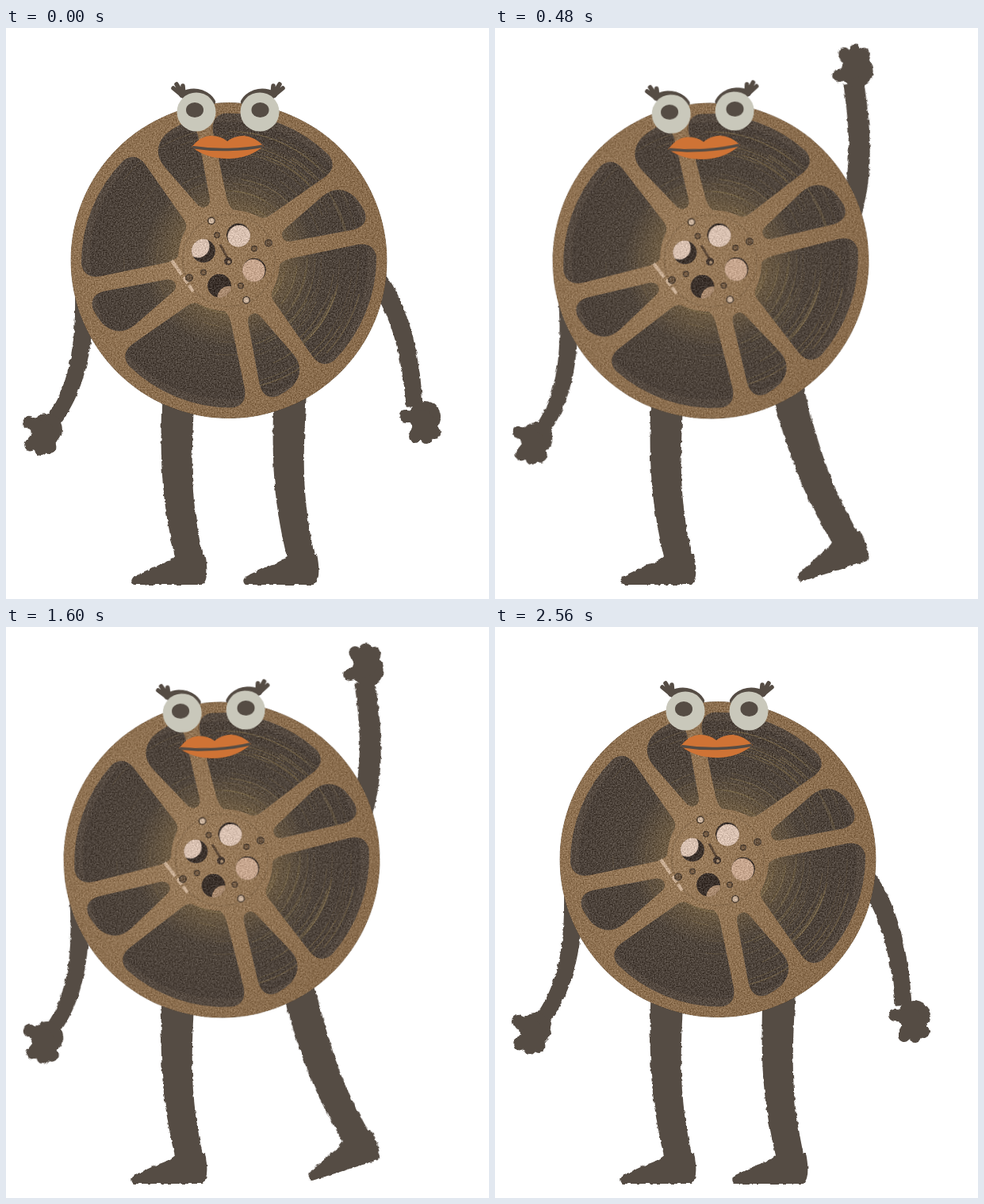
Recreate the animation shown at these times as an HTML page. Size 609 px wide and 721 px high, loop 2.72 s.

```html
<!DOCTYPE html>
<html lang="en">
<head>
<meta charset="utf-8">
<title>Waving film reel</title>
<style>
  html, body { margin: 0; width: 100%; height: 100%; overflow: hidden; background: #fff; }
  svg { display: block; width: 100%; height: 100%; }
</style>
</head>
<body>
<svg viewBox="0 0 609 721">
  <defs>
    <filter id="rough" filterUnits="userSpaceOnUse" x="0" y="0" width="609" height="721" color-interpolation-filters="sRGB">
      <feTurbulence id="boil" type="fractalNoise" baseFrequency=".16" numOctaves="2" seed="1"/>
      <feDisplacementMap in="SourceGraphic" scale="4" xChannelSelector="R" yChannelSelector="G"/>
    </filter>
    <filter id="grain" filterUnits="userSpaceOnUse" x="-210" y="-210" width="420" height="420" color-interpolation-filters="sRGB">
      <feTurbulence type="fractalNoise" baseFrequency=".6" numOctaves="2" seed="4"/>
      <feColorMatrix values="1 0 0 0 0  1 0 0 0 0  1 0 0 0 0  0 0 0 0 1" result="noise"/>
      <feComposite in="SourceGraphic" in2="noise" operator="arithmetic" k2="1" k3=".4" k4="-.2"/>
      <feComposite in2="SourceGraphic" operator="in"/>
    </filter>
    <radialGradient id="metal" gradientUnits="userSpaceOnUse" cx="-40" cy="-10" r="240">
      <stop offset="0" stop-color="#9a7c5b"/><stop offset="1" stop-color="#886b4c"/>
    </radialGradient>
    <radialGradient id="wound" gradientUnits="userSpaceOnUse" r="200" cx="0" cy="0">
      <stop offset=".35" stop-color="#6b5a43"/><stop offset=".55" stop-color="#4f453c"/><stop offset="1" stop-color="#4a4039"/>
    </radialGradient>
    <clipPath id="slots"></clipPath>
    <clipPath id="disc"><circle r="15"/></clipPath>
    <g id="lid" fill="none" stroke="#554c44" stroke-linecap="round">
      <path stroke-width="8" d="M222 84Q235 78 246 82Q256 86 260 93"/>
      <path stroke-width="5.500" d="M223 86L211 76M223 84L215 71M224 83L223 73"/>
    </g>
    <g id="hand" stroke="#554c44" stroke-width="16" stroke-linecap="round">
      <circle r="20" stroke="none"/>
      <path d="M0 0L-24 -1M-4 4L-12 25M0 4L2 26M4 4L12 20"/>
    </g>
    <g id="leg">
      <path id="shin"/>
      <path d="M215 664Q212 672 190 679L162 692Q155 698 161 703L248 703Q257 695 251 664Z"/>
    </g>
  </defs>

  <g fill="#554c44" filter="url(#rough)">
    <use href="#leg"/>
    <use id="legR" href="#leg"/>
    <g id="armL"><path id="sleeveL"/><use href="#hand" transform="translate(51 507) rotate(20)"/></g>
    <g id="armDown"><path id="sleeveDown"/><use href="#hand" transform="translate(528 491)"/></g>
    <g id="armUp"><path id="sleeveUp"/><use href="#hand" transform="translate(496 64) scale(1 -1)"/></g>
  </g>

  <g id="body">
    <g transform="translate(281 293.5)" filter="url(#grain)">
      <circle r="199.500" fill="url(#metal)"/>
      <g clip-path="url(#slots)">
        <circle r="200" fill="url(#wound)"/>
        <circle r="181" fill="none" stroke="#5a4f45" stroke-width="12" opacity=".6"/>
        <g id="film" fill="none" stroke="#947f55"></g>
      </g>
      <circle r="58" fill="none" stroke="#7b6246" stroke-width="2" opacity=".4"/>
      <path d="M-72 0L-45 39" stroke="#cbb096" stroke-width="4" stroke-dasharray="22 4 9 3"/>
      <g id="hub"></g>
      <path d="M-11 -20L1 2" stroke="#5a4635" stroke-width="3"/>
      <circle cx="-1" cy="1" r="5" fill="#453830"/><circle cy="2" r="2" fill="#a98d6f"/>
    </g>
    <use href="#lid"/>
    <use href="#lid" transform="matrix(-1 0 0 1 560 0)"/>
    <g fill="#c9c8bb"><circle cx="240" cy="106" r="24.500"/><circle cx="320" cy="106" r="24.500"/></g>
    <g fill="#554c44"><ellipse cx="238" cy="103.500" rx="11" ry="9.500"/><ellipse cx="320.500" cy="103.500" rx="11" ry="9.500"/></g>
    <path fill="#cf7335" d="M234 150Q246 136 258 136Q271 136 279 143Q288 136 300 136Q313 137 325 149Q306 165 280 165Q252 165 234 150Z"/>
    <path fill="none" stroke="#554c44" stroke-width="3.500" d="M235 150.500Q257 154 280 153.500Q305 153 324 149"/>
  </g>
</svg>

<script>
const $ = id => document.getElementById(id);
const add = (parent, tag, attrs) => {
  const el = parent.appendChild(document.createElementNS('http://www.w3.org/2000/svg', tag));
  for (const k in attrs) el.setAttribute(k, attrs[k]);
  return el;
};
const turn = (id, value) => $(id).setAttribute('transform', value);

// Tapered tube around a cubic curve, from width w0 to w1
function tube(id, [a, b, c, d], w0, w1) {
  const left = [], right = [];
  for (let t = 0; t <= 1; t += 1 / 32) {
    const s = 1 - t;
    const [x, y] = [0, 1].map(k => s ** 3 * a[k] + 3 * s * s * t * b[k] + 3 * s * t * t * c[k] + t ** 3 * d[k]);
    const [u, v] = [0, 1].map(k => s * s * (b[k] - a[k]) + 2 * s * t * (c[k] - b[k]) + t * t * (d[k] - c[k]));
    const r = (w0 + (w1 - w0) * t) / 2 / Math.hypot(u, v);
    left.push([x - v * r, y + u * r]);
    right.unshift([x + v * r, y - u * r]);
  }
  $(id).setAttribute('d', `M${left.concat(right).join('L')}Z`);
}
tube('shin', [[218, 440], [214, 540], [211, 590], [235, 685]], 42, 34);
tube('sleeveL', [[99, 335], [99, 390], [94, 455], [54, 502]], 24, 19);
tube('sleeveDown', [[464, 312], [494, 350], [510, 405], [515, 478]], 25, 21);
tube('sleeveUp', [[450, 250], [478, 200], [487, 145], [489, 78]], 28, 26);

// One wide and one slim opening, a plate screw and a hub hole per quarter turn
const wide = 'M64 5Q70 -1 80 -3L162 -20Q183 -23 186 -4A186 186 0 0 1 133 126Q118 137 106 122L57 52Q51 44 56 36Q63 22 64 5Z';
const slim = 'M67 -31Q66 -36 72 -41L118 -81Q139 -98 159 -80Q166 -72 171 -62Q177 -45 158 -39L78 -24Q69 -23 67 -31Z';
const holes = [
  { fill: '#d9c1b1', cx: 1, cy: 2 },
  { fill: '#c7a68e', cx: -1, cy: 1 },
  { fill: '#a98a6f', cx: 12, cy: 15 },
  { fill: '#d9c1b1', cx: -7, cy: -6 }
];
const bolt = (turned, cx, cy, r, fill) => {
  add(turned, 'circle', { cx, cy, r, fill: '#4f4033' });
  add(turned, 'circle', { cx, cy, r: r - 1.5, fill });
};
holes.forEach((light, i) => {
  const transform = `rotate(${i * 90})`;
  for (const d of [wide, slim]) add($('slots'), 'path', { d, transform });
  const quarter = add($('hub'), 'g', { transform });
  bolt(quarter, -22, -50, 5, i % 2 ? '#6b5642' : '#cdb59f');
  bolt(quarter, -15, -32, 4, '#7a6047');
  const hole = add($('hub'), 'g', {
    transform: `${transform} translate(12 -32) rotate(${-i * 90})`, 'clip-path': 'url(#disc)'
  });
  add(hole, 'circle', { r: 15, fill: '#3b312b' });
  add(hole, 'circle', { r: 14.5, ...light });
});

// Glints on the wound film
let seed = 7;
const rnd = () => (seed = seed * 16807 % 2147483647) / 2147483647;
for (let i = 0; i < 90; i++) {
  const r = 66 + rnd() * 105, len = r * (.2 + rnd() * .7);
  const from = i % 3 ? (i % 2 ? -5 : -95) + rnd() * 40 : rnd() * 360;
  add($('film'), 'circle', {
    r, transform: `rotate(${from})`, opacity: .1 + rnd() * .35,
    'stroke-width': .5 + rnd(), 'stroke-dasharray': `${len} 2000`
  });
}

const LOOP = 2720;
const stepAt = ms => Math.floor(ms < 320 ? ms / 160 : ms < 480 ? 2 + (ms - 320) / 80 : 4 + (ms - 480) / 160);

function draw(step) {
  const waving = step >= 2 && step < 12;
  const lean = waving ? 'translate(272 294) rotate(-2.7) translate(-281 -293.5)' : '';
  const kick = !waving ? 0 : step === 2 ? -2 : step === 3 ? -10 : -17.4;
  const out = step === 2 || step === 5 || step === 7;
  const swing = out ? 0 : step === 3 ? -5 : -10.3;

  turn('body', lean);
  turn('armL', lean);
  turn('legR', `rotate(${kick} 331 427) translate(141 0)`);
  turn('armDown', `rotate(${step === 1 ? -15.5 : 0} 470 330)`);
  turn('armUp', `rotate(${swing} 425 278)`);
  $('armDown').style.display = waving ? 'none' : '';
  $('armUp').style.display = waving ? '' : 'none';
  $('boil').setAttribute('seed', 1 + step % 3);
}

let shown = -1;
const start = performance.now();
function tick() {
  const step = stepAt((performance.now() - start) % LOOP);
  if (step !== shown) draw(shown = step);
  requestAnimationFrame(tick);
}
tick();
</script>
</body>
</html>
```
